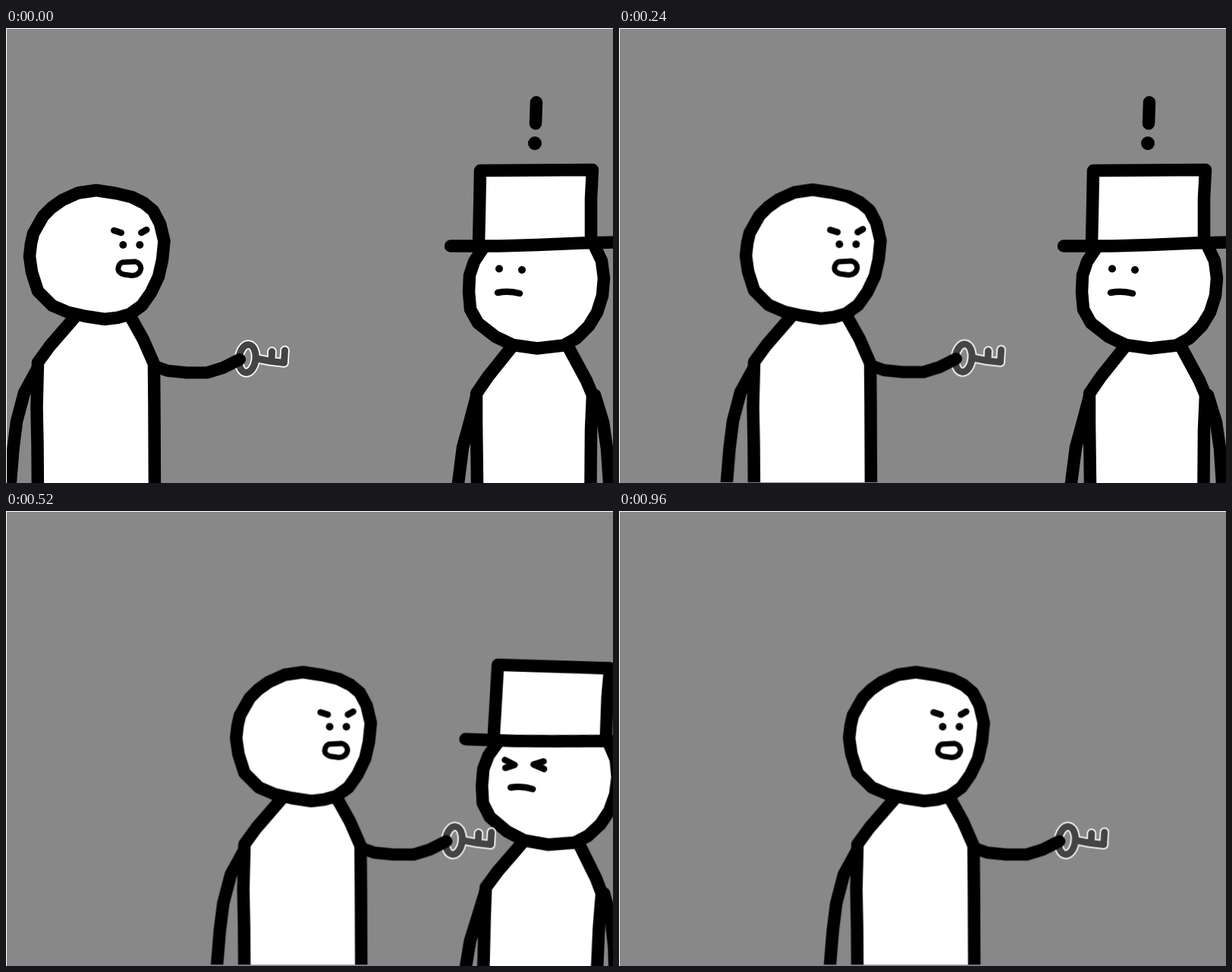
These frames come from a looping animation (800 by 600 pixels, 3200 ms). An HTML page:

```html
<!DOCTYPE html>
<html lang="en">
<head>
<meta charset="utf-8">
<title>Key and hat</title>
<style>
  html, body { margin: 0; width: 100%; height: 100%; overflow: hidden; background: #888; }
  svg { display: block; width: 800px; height: 600px; }

  .ink { fill: none; stroke: #000; stroke-width: 16.5; stroke-linecap: round; stroke-linejoin: round; }
  .skin { fill: #fff; }
  .thin { stroke-width: 8.5; }
  .dot { fill: #000; stroke: none; }

  .walker, .hatter, .calm, .hurt { animation: 3200ms infinite; }
  .walker { animation-name: walk; }
  .hatter { animation-name: fall; transform-origin: 700px 400px; }
  .calm { animation-name: calm; animation-timing-function: step-end; }
  .hurt { animation-name: hurt; animation-timing-function: step-end; }

  /* Both moves advance once every 40 ms. */
  @keyframes walk {
    0% { transform: translate(0, 0); animation-timing-function: steps(12, end); }
    15%, 100% { transform: translate(272.3px, -1.5px); }
  }
  @keyframes fall {
    0% { transform: translate(0, 0) rotate(0deg); visibility: visible; }
    15% { transform: translate(0, 0) rotate(0deg); visibility: visible; animation-timing-function: steps(12, end); }
    30%, 100% { transform: translate(183.6px, 210px) rotate(25.5deg); visibility: hidden; }
  }
  @keyframes calm {
    0% { opacity: 1; }
    16.25%, 100% { opacity: 0; }
  }
  @keyframes hurt {
    0% { opacity: 0; }
    16.25%, 100% { opacity: 1; }
  }
</style>
</head>
<body>
<svg viewBox="0 0 800 600">
  <defs>
    <clipPath id="floor"><rect x="-20" y="0" width="500" height="600"/></clipPath>
    <g id="key">
      <ellipse cx="318" cy="436" rx="11" ry="18.5" transform="rotate(7 318 436)"/>
      <path d="M331 436 L349 439.500 L366.500 441.500 L367.500 425 M350 439.500 L350.500 426.500"/>
    </g>
  </defs>

  <rect width="800" height="600" fill="#888"/>

  <g class="ink calm">
    <path d="M699 98 L698 126"/>
    <circle class="dot" cx="697" cy="152" r="9"/>
  </g>

  <g class="ink hatter">
    <!-- arms and body -->
    <path d="M620 486 L611 520 L602 553 L596 600 L594 650"/>
    <path d="M776 484 L787 520 L792 555 L795 600 L798 650"/>
    <path class="skin" d="M621 650 L621 600 L620 520 L620 482 L635 460 L671 415 L738 415 L765 465 L773 484 L771 530 L770.500 600 L770 650"/>
    <!-- head -->
    <path class="skin" d="M629 290 L617 308 L611 326 L610 348 L612 371 L622 389 L645 407 L668 418 L700 422.500 L735 418.500 L752 409 L768 393 L779 375 L786 353 L788 330 L785 307 L776 288"/>
    <!-- hat -->
    <path class="skin" d="M623 284 L624 240 L625 188 L700 187.500 L773 187 L771 225 L771 282"/>
    <path d="M586 287.500 L650 287.500 L700 286 L760 283.500 L830 282"/>
    <!-- face -->
    <g class="calm">
      <circle class="dot" cx="650" cy="317.500" r="5"/>
      <circle class="dot" cx="680" cy="319" r="5"/>
    </g>
    <path class="thin hurt" d="M639 313 L652 319 L640 323.500 M690 313 L677 317.500 L691 323"/>
    <path class="thin" d="M648 349 Q662 346 677 350"/>
  </g>

  <g class="walker">
    <g class="ink" clip-path="url(#floor)">
      <!-- arm and body -->
      <path d="M41 450 L24 481 L14 519 L9.500 555 L5 610"/>
      <path class="skin" d="M42 620 L41.500 550 L40.500 500 L42 441 L58 419 L97 374 L158 374 L166 384 L181 411 L195 443 L195.500 500 L196 620"/>
      <!-- head -->
      <path class="skin" d="M119 214 L145 218 L166 223 L182 231 L194 241 L203 258 L208.500 281 L206 306 L201 328 L191 349 L179 366 L163 377.500 L147 382 L130 384 L104 380 L82 375 L61 366 L42 347 L34 322 L31 301 L33 284 L36 271 L49 248 L60 237 L74 227 L95 217.500 Z"/>
      <!-- face -->
      <g transform="translate(-.7 0)">
        <path class="thin" d="M143 267 L152.500 270 M179 270 L186 266"/>
        <circle class="dot" cx="155" cy="286" r="5"/>
        <circle class="dot" cx="177" cy="286" r="5"/>
        <path stroke-width="7" d="M154 309 L171 308 Q178 310 178.500 317 Q177 326 167 326.500 L156 325 Q149 323 148.500 318 Q149 311 154 309 Z"/>
      </g>
      <!-- key in the outstretched hand -->
      <use href="#key" stroke="#fff" stroke-width="12.500"/>
      <use href="#key" stroke="#444" stroke-width="9"/>
      <path stroke-width="16" d="M196 446 L213 452 L238 454.500 L265 454.500 L286 448 L308 437"/>
    </g>
  </g>

  <path d="M0 0H800V1H1V600H0Z" fill="#fff"/>
</svg>
</body>
</html>
```
